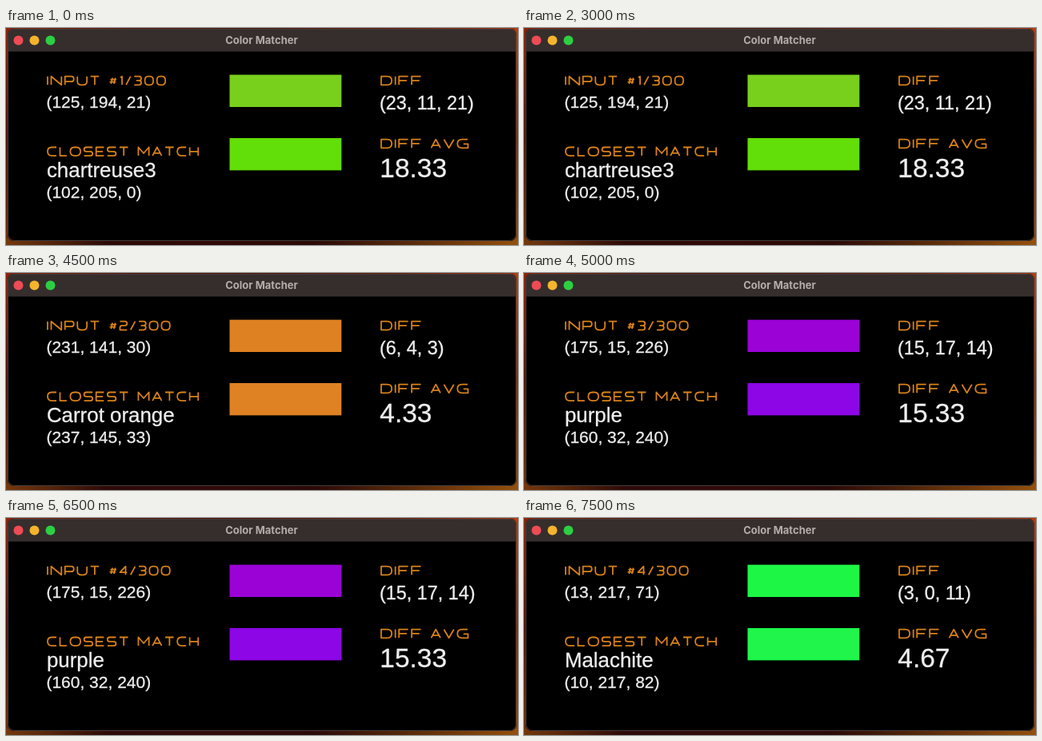
An HTML page with a canvas that plays this animation: 640x272 px, repeating every 8 s.

```html
<!DOCTYPE html>
<html lang="en">
<head>
<meta charset="utf-8">
<title>Color Matcher</title>
<style>
  html, body { margin: 0; width: 100%; height: 100%; overflow: hidden; background: #000; }
  canvas { display: block; }
</style>
</head>
<body>
<canvas id="stage" width="640" height="272" role="img"></canvas>
<script>
const canvas = document.getElementById('stage');
const ctx = canvas.getContext('2d');
const LOOP = 8000;
const SANS = '"Liberation Sans", Arial, sans-serif';
const GLYPH_SCALE = 0.88;
const GLYPH_GAP = 4.5;

const chartreuse = { input: [125, 194, 21], match: [102, 205, 0], name: 'chartreuse3',
  diff: [23, 11, 21], avg: '18.33', swatches: ['#78cf1c', '#62de08'] };
const carrot = { input: [231, 141, 30], match: [237, 145, 33], name: 'Carrot orange',
  diff: [6, 4, 3], avg: '4.33', swatches: ['#de8122', '#df8224'] };
const purple = { input: [175, 15, 226], match: [160, 32, 240], name: 'purple',
  diff: [15, 17, 14], avg: '15.33', swatches: ['#9a02d6', '#8c06e6'] };
const malachite = { input: [13, 217, 71], match: [10, 217, 82], name: 'Malachite',
  diff: [3, 0, 11], avg: '4.67', swatches: ['#1ef646', '#1ff54a'] };

// The counter moves on before the next colour is found.
const steps = [
  { at: 0, count: 1, color: chartreuse },
  { at: 3500, count: 2, color: carrot },
  { at: 5000, count: 3, color: purple },
  { at: 6500, count: 4, color: purple },
  { at: 7000, count: 4, color: malachite }
];

// Wide display lettering: [width, stroke path], 12 units tall.
const glyphs = {
  ' ': [4.5, ''],
  '#': [10, 'M4.5 2L2.5 10.5M8.5 2L6.5 10.5M1.5 4.5H10M0.5 8H9'],
  '/': [6.5, 'M0 12L6.5 0'],
  '0': [12, 'M4.5 0H7.5Q12 0 12 6T7.5 12H4.5Q0 12 0 6T4.5 0Z'],
  '1': [3.5, 'M0.5 1.5L3 0V12'],
  '2': [10, 'M0 0H7Q10 0 10 3T7 6H3Q0 6 0 9V12H10'],
  '3': [10, 'M0 0H7Q10 0 10 3T7 6H3M7 6Q10 6 10 9T7 12H0'],
  '4': [10, 'M8 12V0L0 8.5H10'],
  A: [13, 'M0 12L6.5 0L13 12M2.5 8.5H10.5'],
  C: [12.5, 'M12.5 0H6Q0 0 0 6T6 12H12.5'],
  D: [15, 'M0 0H8.5Q15 0 15 6T8.5 12H0Z'],
  E: [11, 'M11 0H0V12H11M0 6H9.5'],
  F: [13, 'M13 0H0V12M0 6H11'],
  G: [15, 'M14.5 0H6.5Q0 0 0 6T6.5 12H15V6.5H8.5'],
  H: [12, 'M0 0V12M12 0V12M0 6H12'],
  I: [0, 'M0 0V12'],
  L: [9.5, 'M0 0V12H9.5'],
  M: [15, 'M0 12V0L7.5 8.5L15 0V12'],
  N: [14.5, 'M0 12V0L14.5 12V0'],
  O: [14.5, 'M6 0H8.5Q14.5 0 14.5 6T8.5 12H6Q0 12 0 6T6 0Z'],
  P: [12.5, 'M0 12V0H9Q12.5 0 12.5 3.7T9 7.4H0'],
  S: [12, 'M12 0H3Q0 0 0 3T3 6H9Q12 6 12 9T9 12H0'],
  T: [12, 'M0 0H12M6 0V12'],
  U: [13.5, 'M0 0V7Q0 12 5 12H8.5Q13.5 12 13.5 7V0'],
  V: [14, 'M0 0L7 12L14 0']
};
for (const key in glyphs) glyphs[key] = { width: glyphs[key][0], path: new Path2D(glyphs[key][1]) };

function heading(label, x, y) {
  ctx.strokeStyle = '#d98218';
  ctx.lineWidth = 2;
  ctx.lineJoin = 'round';
  for (const ch of label) {
    const glyph = glyphs[ch];
    ctx.save();
    ctx.translate(x, y);
    ctx.scale(GLYPH_SCALE, GLYPH_SCALE);
    ctx.stroke(glyph.path);
    ctx.restore();
    x += glyph.width * GLYPH_SCALE + GLYPH_GAP;
  }
}

function text(str, x, y, size) {
  ctx.font = `${size}px ${SANS}`;
  ctx.textAlign = 'left';
  ctx.fillStyle = ctx.strokeStyle = '#efefef';
  ctx.lineWidth = 0.3;
  ctx.fillText(str, x, y);
  ctx.strokeText(str, x, y);
}

const triple = values => `(${values.join(', ')})`;

function gradient(stops, x1, y1) {
  const fill = ctx.createLinearGradient(0, 0, x1, y1);
  stops.forEach((c, i) => fill.addColorStop(i / (stops.length - 1), c));
  return fill;
}

function drawDesktop() {
  ctx.fillStyle = gradient(['#8a240c', '#541409', '#4c1409', '#6a1c0a', '#a8360e'], 640, 0);
  ctx.fillRect(0, 0, 640, 264);
  ctx.fillStyle = gradient(['#8a240c', '#4e120a', '#6a300c'], 0, 272);
  ctx.fillRect(0, 0, 4, 272);
  ctx.fillStyle = gradient(['#b83c10', '#8a300c', '#94480c'], 0, 272);
  ctx.fillRect(636, 0, 4, 272);
  ctx.fillStyle = gradient(['#74380c', '#2c0a08', '#300a08', '#2a0a07', '#5c2c0a', '#94500c'], 640, 0);
  ctx.fillRect(0, 264, 640, 8);
}

function drawWindow() {
  ctx.save();
  ctx.beginPath();
  ctx.roundRect(2, 1, 636, 266, 8);
  ctx.clip();
  ctx.fillStyle = '#000';
  ctx.fillRect(0, 0, 640, 272);
  ctx.fillStyle = '#352e2d';
  ctx.fillRect(0, 0, 640, 29.5);
  ctx.restore();
  ctx.beginPath();
  ctx.roundRect(2.5, 1.5, 635, 265, 8);
  ctx.strokeStyle = '#443c3a';
  ctx.lineWidth = 1;
  ctx.stroke();

  ['#ee4b55', '#f4b42c', '#2dcf42'].forEach((color, i) => {
    ctx.fillStyle = color;
    ctx.beginPath();
    ctx.arc(15.5 + i * 20, 15.5, 6, 0, Math.PI * 2);
    ctx.fill();
  });

  ctx.font = '700 13px Inter, Roboto, sans-serif';
  ctx.textAlign = 'center';
  ctx.fillStyle = '#b4adac';
  ctx.fillText('Color Matcher', 319.5, 19.8);
}

function draw({ count, color }) {
  drawDesktop();
  drawWindow();
  heading(`INPUT #${count}/300`, 52, 60.7);
  text(triple(color.input), 50.4, 99.8, 21);
  heading('CLOSEST MATCH', 52, 149.5);
  text(color.name, 50.9, 186.7, 25.9);
  text(triple(color.match), 50.4, 213.3, 21);

  color.swatches.forEach((fill, i) => {
    ctx.fillStyle = fill;
    ctx.fillRect(279.5, 58.6 + i * 79.4, 139.8, 40.4);
  });

  heading('DIFF', 469, 60.7);
  text(triple(color.diff), 466.9, 101.6, 23.4);
  heading('DIFF AVG', 469, 139.7);
  text(color.avg, 467.3, 187.2, 33.5);
  canvas.setAttribute('aria-label',
    `Input #${count}/300 ${triple(color.input)}, closest match ${color.name} ${triple(color.match)}`);
}

const start = performance.now();
let shown = null;
function tick(now) {
  const t = Math.max(0, now - start) % LOOP;
  const step = steps.filter(s => s.at <= t).pop();
  if (step !== shown) draw(shown = step);
  requestAnimationFrame(tick);
}
draw(shown = steps[0]);
requestAnimationFrame(tick);
</script>
</body>
</html>
```
